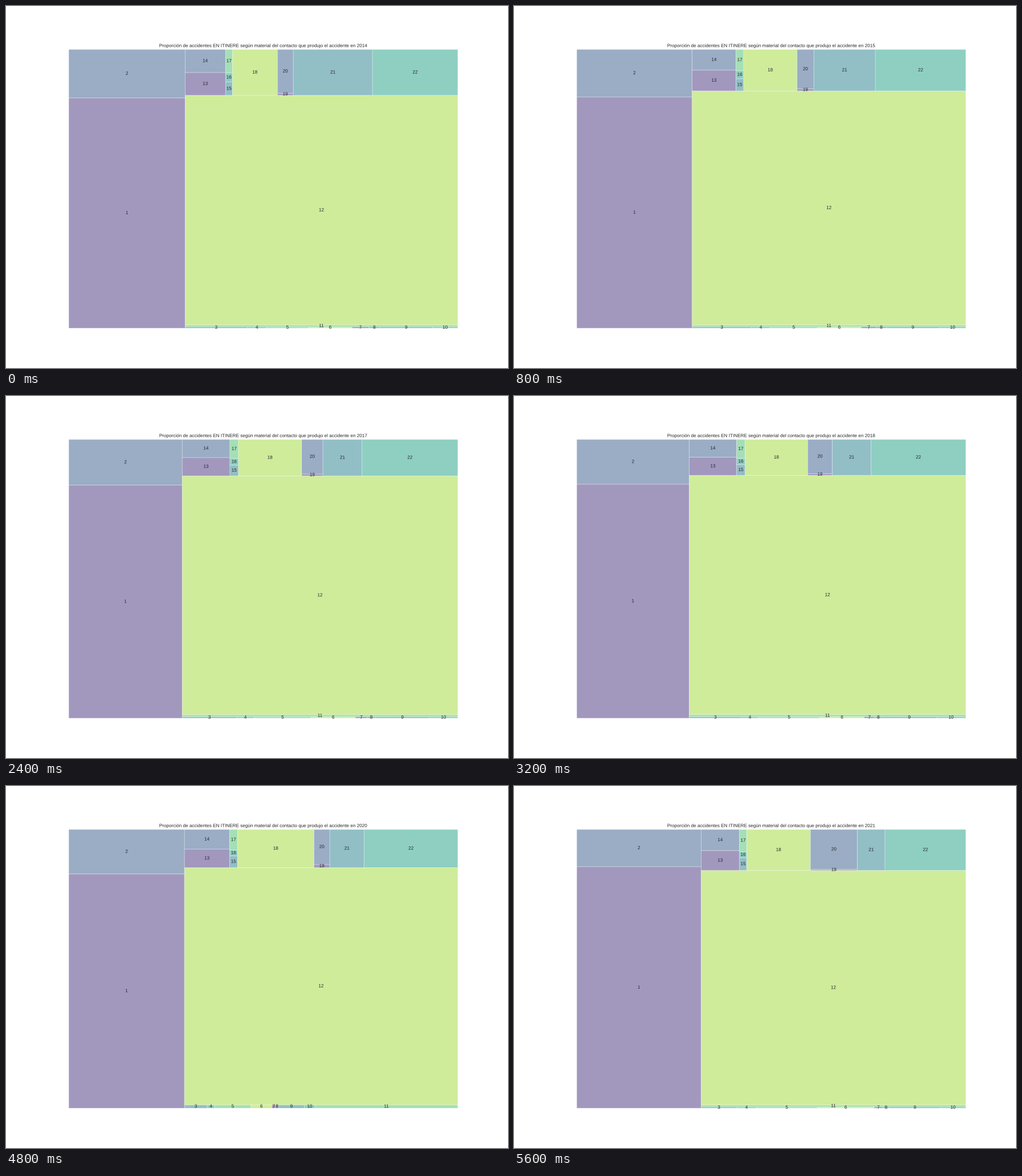
These frames come from a looping animation (881x636 px, 6400 ms). A matplotlib script:

```python
import matplotlib.pyplot as plt
import numpy as np
from matplotlib.animation import FuncAnimation
from matplotlib.patches import PathPatch, Rectangle
from matplotlib.textpath import TextPath
from matplotlib.transforms import Affine2D

W, H, DPI = 881, 636, 64
LEFT, BOTTOM = 0.125 * W, 0.11 * H
PLOT_W, PLOT_H = 0.775 * W, 0.77 * H
FIRST_YEAR, STEPS = 2014, 8
EM = 8.157                          # font size in pixels
INK = "#262626"
TITLE = ("Proporción de accidentes EN ITINERE según material del contacto "
         "que produjo el accidente en {}")
COLORS = plt.get_cmap("viridis")(np.linspace(0, 1, 8)[1:-1])

# Percent shares as {years since the first: share}, linear in between.
MAIN = [{0: 24.71, 4: 24.28, 5: 23.21, 6: 25, 7: 27.69},
        {0: 5.2, 5: 4.5, 6: 4.74, 7: 4.27}]
STRIP = [{0: .074, 6: .07, 7: .042}, {0: .023},
         {0: .05, 4: .084, 6: .112, 7: .072}, {0: .052, 7: .067},
         {0: .02, 7: .01}, {0: .013, 7: .008},
         {0: .063, 6: .08, 7: .06}, {0: .03, 4: .04, 7: .03},
         {0: .46, 4: .525, 6: .44, 7: .45}]
TOP_ROW = [{0: .85, 6: .77, 7: .7}, {0: .86, 5: .75, 6: .82, 7: .75},
           {0: .085}, {0: .06, 7: .04}, {0: .15},
           {0: 1.9, 2: 2.18, 4: 2.07, 5: 2.14, 6: 2.69, 7: 2.4},
           {0: .03, 7: .047},
           {0: .64, 2: .58, 4: .777, 5: .566, 6: .51, 7: 1.727},
           {0: 3.35, 2: 1.35, 4: 1.28, 5: 1.38, 7: 1.04},
           {0: 3.61, 2: 3.3, 4: 3.14, 5: 3.54, 7: 3.05}]


def shares(step):
    """All 22 shares; number 12 takes what the others leave."""
    def at(group):
        return [np.interp(step, list(keys), list(keys.values())) for keys in group]

    head, tail = at(MAIN + STRIP), at(TOP_ROW)
    return [*head, 100 - sum(head) - sum(tail), *tail]


def worst_ratio(row, side):
    depth = sum(row) / side
    return max(max(depth * depth / a, a / (depth * depth)) for a in row)


def squarify(areas, x, y, w, h):
    """Squarified treemap that keeps the given order."""
    if not areas:
        return []
    side = min(w, h)
    n = 1
    while n < len(areas) and worst_ratio(areas[:n], side) >= worst_ratio(areas[:n + 1], side):
        n += 1
    depth = sum(areas[:n]) / side
    boxes, pos = [], 0
    for area in areas[:n]:
        size = area / depth
        boxes.append((x, y + pos, depth, size) if w >= h else (x + pos, y, size, depth))
        pos += size
    rest = (x + depth, y, w - depth, h) if w >= h else (x, y + depth, w, h - depth)
    return boxes + squarify(areas[n:], *rest)


def centered(text):
    """Text outline with its ink centred on x = 0, baseline on y = 0."""
    path = TextPath((0, 0), text, size=EM, prop={"family": "Liberation Sans"})
    box = path.get_extents()
    return path.transformed(Affine2D().translate(-(box.x0 + box.x1) / 2, 0))


fig = plt.figure(figsize=(W / DPI, H / DPI), dpi=DPI, facecolor="white")
ax = fig.add_axes([0, 0, 1, 1])
ax.set(xlim=(0, W), ylim=(0, H))
ax.axis("off")


def add_text(text):
    return ax.add_patch(PathPatch(centered(text), facecolor=INK, linewidth=0,
                                  snap=False, zorder=3))


def move(patch, x, y):
    patch.set_transform(Affine2D().translate(x, y) + ax.transData)


titles = [centered(TITLE.format(FIRST_YEAR + i)) for i in range(STEPS)]
title = add_text(TITLE.format(FIRST_YEAR))
move(title, LEFT + PLOT_W / 2, BOTTOM + PLOT_H + EM / 2)
tiles, labels = [], []
for i in range(22):
    tile = Rectangle((0, 0), 1, 1, facecolor=COLORS[i % 6], edgecolor="white",
                     linewidth=0.68 * 72 / DPI, alpha=0.5, snap=False)
    tiles.append(ax.add_patch(tile))
    labels.append(add_text(str(i + 1)))


def draw(step):
    title.set_path(titles[step])
    boxes = squarify([100 * s for s in shares(step)], 0, 0, 100, 100)
    for tile, label, (x, y, w, h) in zip(tiles, labels, boxes):
        x, w = LEFT + x * PLOT_W / 100, w * PLOT_W / 100
        y, h = BOTTOM + y * PLOT_H / 100, h * PLOT_H / 100
        tile.set_bounds(x, y, w, h)
        move(label, x + w / 2, y + h / 2 - EM / 4)
    return [title, *tiles, *labels]


anim = FuncAnimation(fig, draw, frames=STEPS, interval=800,
                     repeat=True, repeat_delay=0)
plt.show()
```
